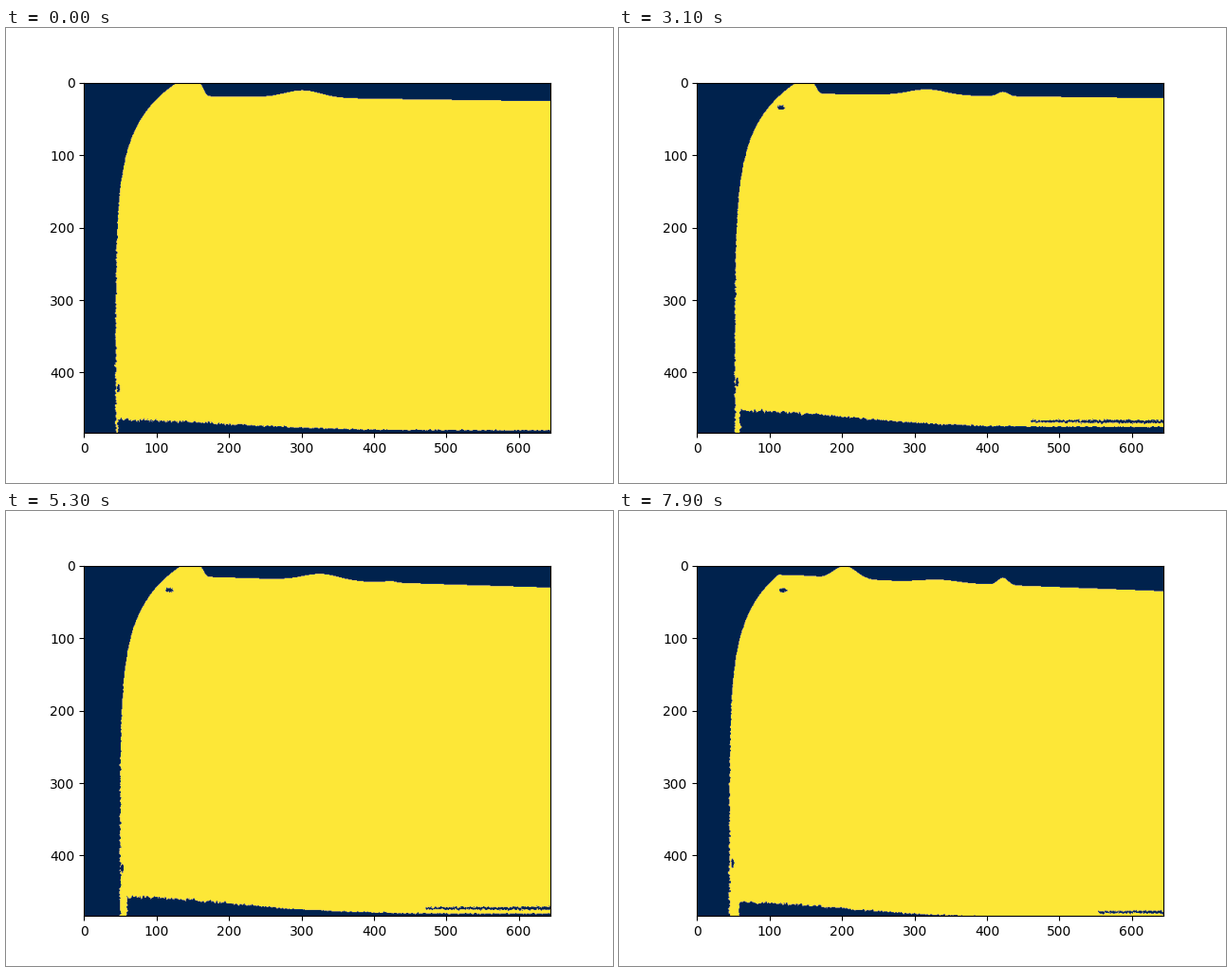
A matplotlib script that plays this animation: 640 by 480 pixels, repeating every 8 s.

```python
import numpy as np
import matplotlib.pyplot as plt
from matplotlib.animation import FuncAnimation

W, H, FRAMES = 644, 484, 80
X, Y = np.arange(W), np.arange(H)
GX, GY = np.meshgrid(X, Y)
KEYS = (0, 22, 39, 62, 79)


def drift(i, *values):
    return np.interp(i, KEYS, values)


def bump(x, mid, width):
    return np.exp(-((x - mid) / width) ** 2)


def ragged(rng, n):
    """Edge noise that clumps over neighbouring pixels."""
    return np.convolve(rng.normal(size=n + 2), (0.4, 0.8, 0.4), "valid")


def top_edge(i):
    slope = (X - 200) / (W - 200)
    left = drift(i, 19.5, 18.5, 14, 18.5, 18.5)
    right = drift(i, 26, 20.5, 23, 35.5, 35.5)
    edge = left + (right - left) * slope
    # wide hill, a small knob, and a peak that rises late
    edge -= drift(i, 10, 7, 9, 9, 4) * bump(X, drift(i, 302, 320, 315, 335, 335), 35)
    edge -= drift(i, 0, 6, 6, 0, 10) * bump(X, 422, 10)
    edge -= np.interp(i, (66, 79), (0, 18)) * bump(X, 204, 22)
    # the gap at the corner closes near the end
    gap = np.interp(i, (54, 62, 79), (1, 0.3, 0.15))
    return edge * (1 - gap / (1 + np.exp((X - 165) / 2)))


def mask(i):
    rng = np.random.default_rng(i)
    rough = rng.normal(size=(H, W))

    side = drift(i, 43.5, 50.5, 53.5, 47, 44.5)
    left = side + 85 * np.exp(-Y / 57) + np.clip(Y / 400, 0, 1) * ragged(rng, H) * 0.8

    start, end = drift(i, 466, 455, 450, 462, 465), drift(i, 480, 477, 474, 485, 486)
    base = end + (start - end) * bump(X, 50, 214)
    grain = 0.4 + 0.8 * bump(X, 50, 170)
    above = GY < base + grain * ragged(rng, W) + 0.4 * grain * rough
    foot = side + 3 + 0.13 * i
    strip = GX < foot + 0.7 * ragged(rng, H)[:, None]
    area = (GX > left[:, None]) & (GY >= top_edge(i)) & (above | strip)

    # thin ragged line at the lower right
    line = drift(i, 900, 450, 470, 473, 553)
    half = np.where(X > line, 1.3 + 0.004 * (X - line), -9)
    mid = end - 7.5 + 0.5 * ragged(rng, W)
    area &= ~(abs(GY - mid) < half + 0.5 * rough)

    # flickering specks by the corner and the foot
    specks = [(side + 4, 412, 2, 6)]
    if i >= 20:
        specks.append((117, 31, 5, 3))
    for x, y, rx, ry in specks:
        dx, dy = rng.normal(scale=(1, 4))
        area &= ((GX - x - dx) / rx) ** 2 + ((GY - y - dy) / ry) ** 2 > 1 + 0.3 * rough
    return area.astype(float)


fig, ax = plt.subplots(figsize=(6.4, 4.8), dpi=100)
image = ax.imshow(mask(0), cmap="cividis", vmin=0, vmax=1)


def update(i):
    image.set_data(mask(i))
    return [image]


anim = FuncAnimation(fig, update, frames=FRAMES, interval=100,
                     repeat=True, repeat_delay=0)
plt.show()
```
